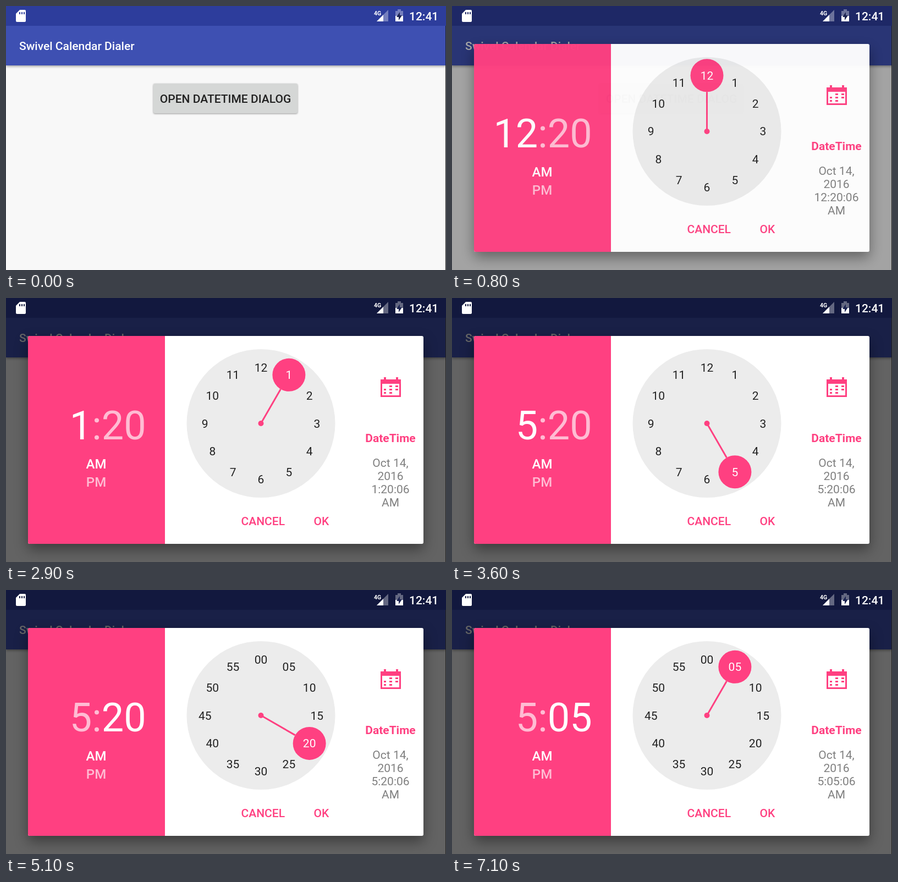
An HTML page for the animation above (8 s loop, 800 by 480 pixels).

```html
<!DOCTYPE html>
<html lang="en">
<head>
<meta charset="utf-8">
<title>Date and time dialog</title>
<style>
  html, body { margin: 0; width: 100%; height: 100%; overflow: hidden; background: #f8f8f8; }
  svg { display: block; width: 100%; height: 100%; font: 21px Roboto, sans-serif; }
  .medium { font-weight: 500; }
  .mid { text-anchor: middle; }
  .pink { fill: #ff4081; }
  #bar { filter: drop-shadow(0 2px 2px rgba(0, 0, 0, .35)); }
  #button { filter: drop-shadow(0 1px 1.5px rgba(0, 0, 0, .4)); }
  #sheet { filter: drop-shadow(0 10px 12px rgba(0, 0, 0, .4)); }
  .big { font-size: 72px; fill: #fff; }
</style>
</head>
<body>
<svg viewBox="0 0 800 480">
  <defs>
    <clipPath id="buttonClip"><rect x="268" y="141" width="262" height="54" rx="3"/></clipPath>
  </defs>

  <rect width="800" height="480" fill="#f8f8f8"/>
  <rect id="bar" y="36" width="800" height="72" fill="#3e50b2"/>
  <rect width="800" height="36" fill="#2d3d9c"/>
  <text x="24" y="80" class="medium" fill="#fff">Swivel Calendar Dialer</text>
  <rect id="button" x="268" y="141" width="262" height="54" rx="3" fill="#d5d7d6"/>
  <circle id="ripple" cx="399" cy="168" clip-path="url(#buttonClip)"/>
  <text x="399" y="176" class="medium mid" fill="#212121">OPEN DATETIME DIALOG</text>

  <rect id="dim" width="800" height="480"/>

  <g fill="#fff">
    <path fill-rule="evenodd" d="M25 7H34a2 2 0 0 1 2 2V27a2 2 0 0 1-2 2H20a2 2 0 0 1-2-2V14zM24 11v4h2v-4zm4 0v4h2v-4zm4 0v4h2v-4z"/>
    <text x="669" y="17" font-size="10.5" font-weight="700">4G</text>
    <path d="M674 28L695 7V28z" opacity=".35"/>
    <path d="M674 28L686 16V28z"/>
    <path d="M708 9h4V6h6v3h4V18H708z" opacity=".35"/>
    <path d="M708 18H722V28H708z"/>
    <path d="M716 11L710 20H714V26L720 17H716z" fill="#1a2250"/>
    <text x="733" y="26" class="medium">12:41</text>
  </g>

  <g id="dialog">
    <rect id="sheet" x="40" y="69" width="719" height="378" rx="3" fill="#fff"/>
    <path class="pink" d="M289 69H43a3 3 0 0 0-3 3V444a3 3 0 0 0 3 3H289z"/>
    <text id="hour" class="big" x="156.3" y="257" text-anchor="end"></text>
    <text class="big mid" x="165" y="257" opacity=".65">:</text>
    <text id="minute" class="big" x="173.7" y="257"></text>
    <g class="medium mid" font-size="24" fill="#fff">
      <text x="164" y="310">AM</text>
      <text x="164" y="343" opacity=".65">PM</text>
    </g>
    <circle cx="463.5" cy="228" r="135" fill="#ececec"/>
    <g id="dials"></g>
    <circle class="pink" cx="463.5" cy="228" r="5"/>
    <g class="pink medium">
      <text x="427.5" y="413">CANCEL</text>
      <text x="559.5" y="413">OK</text>
      <text x="699" y="262" class="mid" font-weight="700" style="font-weight:700">DateTime</text>
      <path fill-rule="evenodd" d="M681 148h6v-4h4v4h18v-4h4v4h5V180H681zM684 156V177H715V156z"/>
      <path d="M697 159h5v3h-5zm11 0h5v3h-5zM687 165h4v3h-4zm10 0h5v3h-5zm11 0h5v3h-5zM687 171h4v3h-4zm10 0h5v3h-5z"/>
    </g>
    <g class="mid" fill="#7f7f7f">
      <text x="699" y="307">Oct 14,</text>
      <text x="699" y="331">2016</text>
      <text id="clock" x="699" y="355"></text>
      <text x="699" y="379">AM</text>
    </g>
  </g>
  <rect x="799" y="36" width="1" height="444" fill="#222"/>
</svg>

<script>
const CX = 463.5, CY = 228, REACH = 101.8, KNOB = 30;
const HOUR_TIMES = [2900, 3000, 3200, 3500, 3600];
const DRAG = [20, 18, 15, 12, 9, 7, 5];
const SWAP = 4400;

const $ = id => document.getElementById(id);
const clamp = (v, lo = 0, hi = 1) => Math.min(hi, Math.max(lo, v));
const pad = n => String(n).padStart(2, '0');
const point = (turn, r) => [CX + r * Math.sin(turn * 2 * Math.PI), CY - r * Math.cos(turn * 2 * Math.PI)];

function set(el, attrs) {
  for (const name in attrs) el.setAttribute(name, attrs[name]);
}

function makeDial(id, label) {
  const labels = Array.from({ length: 12 }, (_, i) => {
    const [x, y] = point(i / 12, REACH);
    return `<text x="${x}" y="${y + 7.5}">${label(i)}</text>`;
  }).join('');
  $('dials').insertAdjacentHTML('beforeend', `
    <g id="${id}" class="mid">
      <clipPath id="${id}Clip"><circle r="${KNOB}"/></clipPath>
      <g fill="#212121">${labels}</g>
      <line x1="${CX}" y1="${CY}" stroke="#ff4081" stroke-width="3"/>
      <circle class="pink knob" r="${KNOB}"/>
      <g fill="#fff" clip-path="url(#${id}Clip)">${labels}</g>
      <circle class="dot" r="3" fill="#fff"/>
    </g>`);
  const group = $(id);
  return (turn, opacity) => {
    const [cx, cy] = point(turn, REACH);
    const [x2, y2] = point(turn, REACH - KNOB);
    const between = Math.abs(turn * 12 - Math.round(turn * 12)) > .01;
    group.querySelectorAll('circle').forEach(c => set(c, { cx, cy }));
    set(group.querySelector('line'), { x2, y2 });
    set(group.querySelector('.dot'), { opacity: between ? 1 : 0 });
    set(group, { opacity });
  };
}

const hourDial = makeDial('hours', i => i || 12);
const minuteDial = makeDial('minutes', i => pad(i * 5));

function draw(t) {
  const grow = clamp((t - 450) / 200);
  set($('ripple'), { r: 135 * grow, opacity: .12 * grow * clamp((1100 - t) / 400) });
  set($('dim'), { opacity: .6 * clamp((t - 650) / 260) });

  const shown = clamp((t - 640) / 165);
  const scale = 1 - .1 * (1 - shown) ** 3;
  set($('dialog'), {
    opacity: shown,
    transform: `translate(399.5 258) scale(${scale}) translate(-399.5 -258)`
  });

  const hour = HOUR_TIMES.filter(at => t >= at).length || 12;
  const minute = DRAG[clamp(Math.floor((t - 5700) / 100), 0, DRAG.length - 1)];
  const onMinutes = t >= SWAP;
  $('hour').textContent = hour;
  $('minute').textContent = pad(minute);
  $('clock').textContent = `${hour}:${pad(minute)}:06`;
  set($('hour'), { opacity: onMinutes ? .65 : 1 });
  set($('minute'), { opacity: onMinutes ? 1 : .65 });

  const fade = t - SWAP - 15;
  hourDial(hour / 12, 1 - clamp(fade / 500));
  minuteDial(minute / 60, clamp((fade - 125) / 500));
}

// The screen refreshes ten times a second.
const start = performance.now();
function tick() {
  const t = (performance.now() - start) % 8000;
  draw(Math.floor(t / 100) * 100);
  requestAnimationFrame(tick);
}
tick();
</script>
</body>
</html>
```
